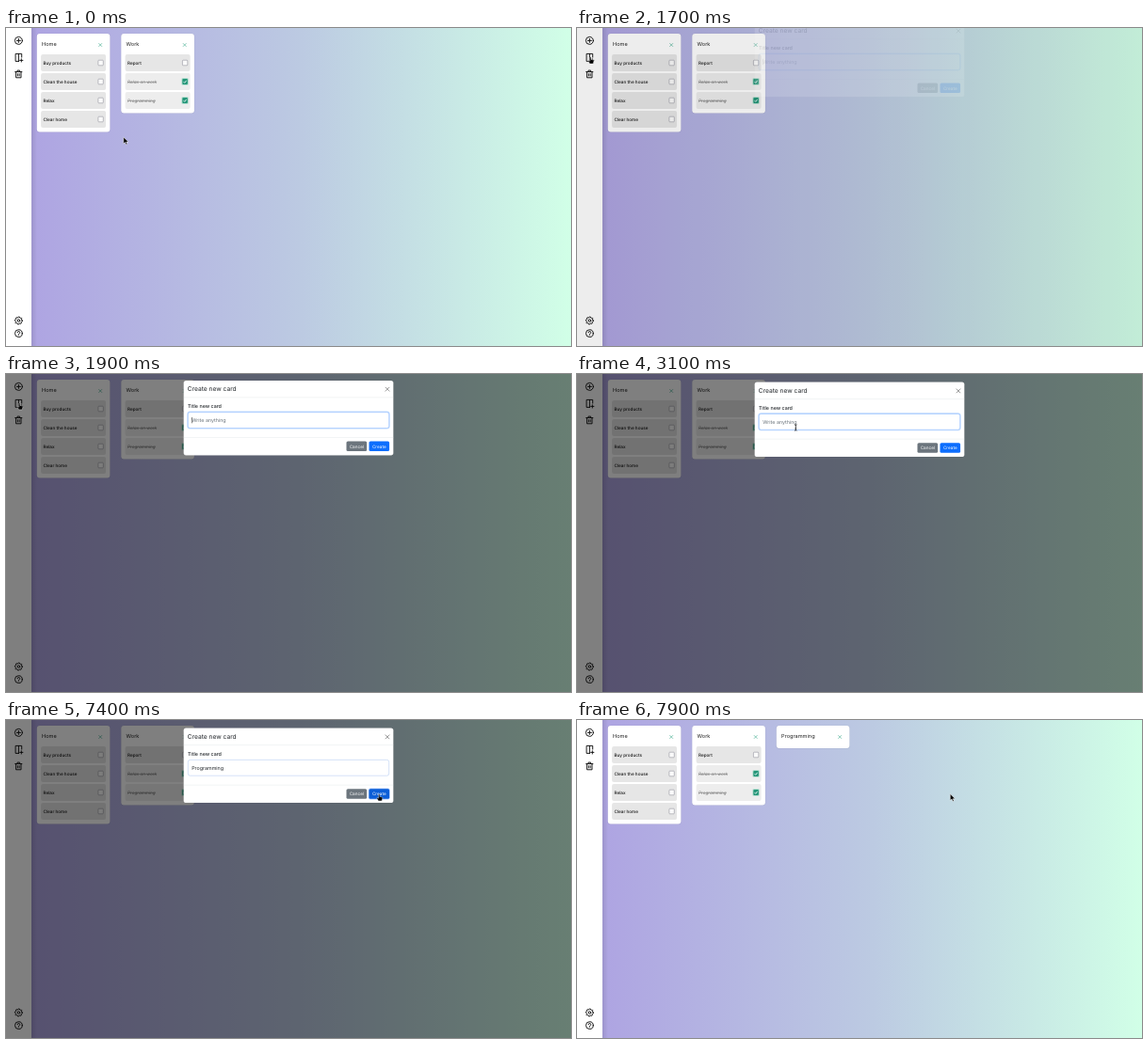
An HTML page that plays this animation: 600x338 px, repeating every 8 s.

```html
<!DOCTYPE html>
<html lang="en">
<head>
<meta charset="utf-8">
<title>Task cards</title>
<style>
  html, body { margin: 0; width: 100%; height: 100%; overflow: hidden; background: #fff; }
  svg { display: block; width: 100vw; height: 100vh; }
  text { font-family: Inter, "Open Sans", sans-serif; text-rendering: geometricPrecision; white-space: pre; }
  .title { font-size: 5.6px; fill: #222; }
  .item { font-size: 4.65px; font-weight: 500; fill: #161616; }
  .done { font-weight: 400; font-style: italic; fill: #777; text-decoration: line-through; }
  .icon { fill: none; stroke: #111; stroke-width: .95; stroke-linecap: round; stroke-linejoin: round; }
  .head { font-size: 6.67px; fill: #212529; }
  .label { font-size: 5.33px; font-weight: 500; fill: #212529; }
  .field { font-size: 5.33px; fill: #212529; }
  .btn { font-size: 4.67px; fill: #fff; text-anchor: middle; }
</style>
</head>
<body>
<svg viewBox="0 0 600 338" preserveAspectRatio="none">
  <defs>
    <linearGradient id="sky">
      <stop offset="0" stop-color="#aea4e2"/>
      <stop offset=".5" stop-color="#bccae2"/>
      <stop offset="1" stop-color="#d1ffe7"/>
    </linearGradient>
    <linearGradient id="edge">
      <stop offset="0" stop-color="#000" stop-opacity=".1"/>
      <stop offset="1" stop-color="#000" stop-opacity="0"/>
    </linearGradient>
  </defs>
  <rect x="26" width="574" height="338" fill="url(#sky)"/>
  <rect x="27" width="6" height="338" fill="url(#edge)"/>
  <rect width="27" height="338" fill="#fff"/>

  <g class="icon">
    <g transform="translate(13.4 13.4)"><circle r="4"/><path d="M-2 0H2M0-2V2"/></g>
    <g transform="translate(13.4 31.4)">
      <path d="M3.3-.3V-4H-3.3V4H.2M0-4V4M2.9 1.4V4.6M1.3 3H4.5"/>
    </g>
    <g transform="translate(13.3 49)">
      <path d="M-3.6-2.4H3.6M-2.7-2.4V3.8H2.7V-2.4M-1.3-2.6V-3.9H1.3V-2.6M-.9-.3V1.9M.9-.3V1.9"/>
    </g>
    <g transform="translate(13.4 311)">
      <path id="gear"/><circle r="1.3"/>
    </g>
    <g transform="translate(13.4 324.6)">
      <circle r="3.9"/><path d="M-1.2-.9A1.25 1.25 0 1 1 .5.2Q0 .4 0 1M0 2.2V2.25"/>
    </g>
  </g>

  <g id="cards"></g>
  <rect id="shade" width="600" height="338"/>

  <g id="modal">
    <rect x="188.6" y="8.6" width="222.8" height="79.5" rx="2.6" fill="#fff" stroke="#000" stroke-opacity=".18" stroke-width=".35"/>
    <path d="M188.8 26.6H411.2M188.8 69.2H411.2" stroke="#dee2e6" stroke-width=".4"/>
    <text class="head" x="192.8" y="20.1">Create new card</text>
    <path d="M403 15.9L407 19.9M407 15.9L403 19.9" stroke="#777" stroke-width=".75" stroke-linecap="round"/>
    <text class="label" x="192.9" y="38">Title new card</text>
    <rect id="ring" x="192.3" y="41.3" width="215.4" height="18.9" rx="3.3" fill="#c2dbfe"/>
    <rect id="box" x="193.3" y="42.4" width="213.4" height="16.8" rx="2.2" fill="#fff" stroke-width=".5"/>
    <text id="hint" class="field" x="197.2" y="52.8" style="fill:#6c757d">Write anything</text>
    <text id="typed" class="field" x="197.2" y="52.8"></text>
    <rect id="caret" y="47.6" width=".5" height="6.4" fill="#111"/>
    <rect x="361.5" y="73.2" width="21.7" height="10.6" rx="1.6" fill="#6c757d"/>
    <text class="btn" x="372.35" y="80.3">Cancel</text>
    <rect id="press" x="384.9" y="72.6" width="22.8" height="11.8" rx="2.2" fill="#a9c8fb"/>
    <rect id="create" x="385.5" y="73.2" width="21.6" height="10.6" rx="1.6"/>
    <text class="btn" x="396.3" y="80.3">Create</text>
  </g>

  <g id="cursor">
    <path id="arrow" d="M0 0V7L1.7 5.5L2.8 8L4 7.4L2.9 5.1H5.2Z" fill="#000" stroke="#fff" stroke-width=".5" stroke-linejoin="round"/>
    <path id="hand" d="M-.6.6Q0-.3.6.6V2.8L3.1 3.4Q3.7 3.7 3.5 4.6L2.8 7.3H-.8L-2.4 4.6Q-2.4 3.6-1.5 3.9L-.6 4.6Z" fill="#000" stroke="#fff" stroke-width=".4" stroke-linejoin="round"/>
    <path id="beam" d="M-1.2-3.2Q0-3.2 0-2.4Q0-3.2 1.2-3.2M0-2.4V2.4M-1.2 3.2Q0 3.2 0 2.4Q0 3.2 1.2 3.2M-.7.9H.7" fill="none" stroke="#111" stroke-width=".75"/>
  </g>
</svg>
<script>
const LOOP = 8000, OPEN = 1680, CLICK = 7300, CLOSE = 7425, ADDED = 7800;
const $ = id => document.getElementById(id);
const clamp = v => Math.max(0, Math.min(1, v));
const show = (id, on) => $(id).setAttribute("display", on ? "inline" : "none");
const smooth = p => p * p * (3 - 2 * p);

// Cubic ease-out (0, 0, .58, 1), solved for time by bisection.
function easeOut(x) {
  let lo = 0, hi = 1;
  for (let i = 0; i < 24; i++) {
    const s = (lo + hi) / 2;
    if (3 * (1 - s) * s * s * .58 + s ** 3 < x) lo = s; else hi = s;
  }
  return lo * lo * (3 - 2 * lo);
}

function gearPath() {
  const points = [];
  for (let i = 0; i < 32; i++) {
    const a = i * Math.PI / 16, r = i % 4 < 2 ? 4.1 : 3.2;
    points.push((r * Math.cos(a)).toFixed(2) + " " + (r * Math.sin(a)).toFixed(2));
  }
  return "M" + points.join("L") + "Z";
}

function row(x, y, label, done) {
  const check = done
    ? `<rect x="${x + 64}" y="${y + 5}" width="7.6" height="7.8" rx="1.6" fill="#b7dfd1"/>
       <rect x="${x + 65}" y="${y + 6}" width="5.6" height="5.8" rx=".9" fill="#26977a"/>
       <path d="M${x + 66.3} ${y + 9}l1.1 1.2 2-2.5" fill="none" stroke="#fff" stroke-width=".8"/>`
    : `<rect x="${x + 65.1}" y="${y + 6.1}" width="5.4" height="5.6" rx=".8" fill="#fafafa" stroke="#92929c" stroke-width=".6"/>`;
  return `<rect x="${x + 4.3}" y="${y}" width="69" height="18" rx="2" fill="${done ? "#ededed" : "#e6e6e6"}"/>
    <text class="item${done ? " done" : ""}" x="${x + 6.7}" y="${y + 10.6}">${label}</text>${check}`;
}

function card(x, name, rows, id) {
  const height = rows.length ? 24.4 + rows.length * 20 : 24;
  const items = rows.map(([label, done], i) => row(x, 28.1 + i * 20, label, done)).join("");
  return `<g id="${id}">
    <rect x="${x - .4}" y="5.8" width="78.4" height="${height + .8}" rx="3.2" fill="#000" opacity=".07"/>
    <rect x="${x}" y="6" width="77.6" height="${height}" rx="3" fill="#fff"/>
    <text class="title" x="${x + 5.3}" y="18.7">${name}</text>
    <path d="M${x + 65.6} 16.2l3.6 3.6m0-3.6l-3.6 3.6" stroke="#5fb8a0" stroke-width=".75"/>
    ${items}</g>`;
}

$("gear").setAttribute("d", gearPath());
$("cards").innerHTML =
  card(32.8, "Home", [["Buy products"], ["Clean the house"], ["Relax"], ["Clear home"]], "home") +
  card(122.3, "Work", [["Report"], ["Relax on work", true], ["Programming", true]], "work") +
  card(211.8, "Programming", [], "added");

// Pointer moves: start, end, from, bend, to.
const moves = [
  [50, 1300, [124.8, 116], [70, 70], [14.4, 30.6]],
  [2520, 3080, [14.4, 30.6], [115, 98], [232.3, 57]],
  [6350, 7200, [232.3, 57], [330, 62], [396.3, 78.6]]
];

function pointer(t) {
  let move = moves[0];
  for (const m of moves) if (t >= m[0]) move = m;
  const [start, end, a, b, c] = move;
  const p = smooth(clamp((t - start) / (end - start))), q = 1 - p;
  return a.map((v, i) => q * q * v + 2 * q * p * b[i] + p * p * c[i]);
}

const word = "Programming";
const keys = [3600, 3800, 3900, 4200, 4500, 4900, 5100, 5300, 5500, 5700, 5800];

function caretOn(t) {
  if (t < 3600) return t < 2100 || (t >= 2600 && t < 3100);
  if (t < 6400) return true;
  return t >= 6900 && t < CLICK;
}

function drawModal(t) {
  const closing = t >= CLOSE;
  const age = t - (closing ? CLOSE : OPEN);
  const fade = clamp(age / 150), slide = easeOut(clamp(age / 300));
  const alpha = closing ? 1 - fade : fade;
  const away = closing ? slide : 1 - slide;
  $("shade").setAttribute("opacity", alpha * .5);
  $("modal").setAttribute("opacity", alpha);
  $("modal").setAttribute("transform", `translate(0 ${-16.67 * away})`);
  show("modal", alpha > 0);

  const count = keys.filter(k => t >= k).length;
  $("typed").textContent = word.slice(0, count);
  show("hint", !count);
  $("caret").setAttribute("x", 197.2 + (count ? $("typed").getComputedTextLength() : -.2));
  show("caret", caretOn(t));

  const focus = t < CLICK;
  show("ring", focus);
  show("press", !focus);
  $("box").setAttribute("stroke", focus ? "#86b7fe" : "#a9c4ee");
}

function drawPointer(t) {
  const [x, y] = pointer(t);
  const open = t >= OPEN && t < CLOSE;
  const inField = open && x > 193 && x < 407 && y > 42 && y < 59.5;
  const onCreate = open && x > 385.5 && x < 407 && y > 73 && y < 84;
  const onIcon = x < 18 && y < 37;
  const hand = onCreate || onIcon;
  $("cursor").setAttribute("transform", `translate(${x} ${y})`);
  show("cursor", t < 3600 || t >= 6400);
  show("beam", inField);
  show("hand", hand);
  show("arrow", !inField && !hand);
  $("create").setAttribute("fill", onCreate || t >= CLICK ? "#0b5ed7" : "#0d6efd");
}

function draw(t) {
  show("added", t >= ADDED);
  drawModal(t);
  drawPointer(t);
}

const begin = performance.now();
function tick() {
  draw((performance.now() - begin) % LOOP);
  requestAnimationFrame(tick);
}
tick();
</script>
</body>
</html>
```
